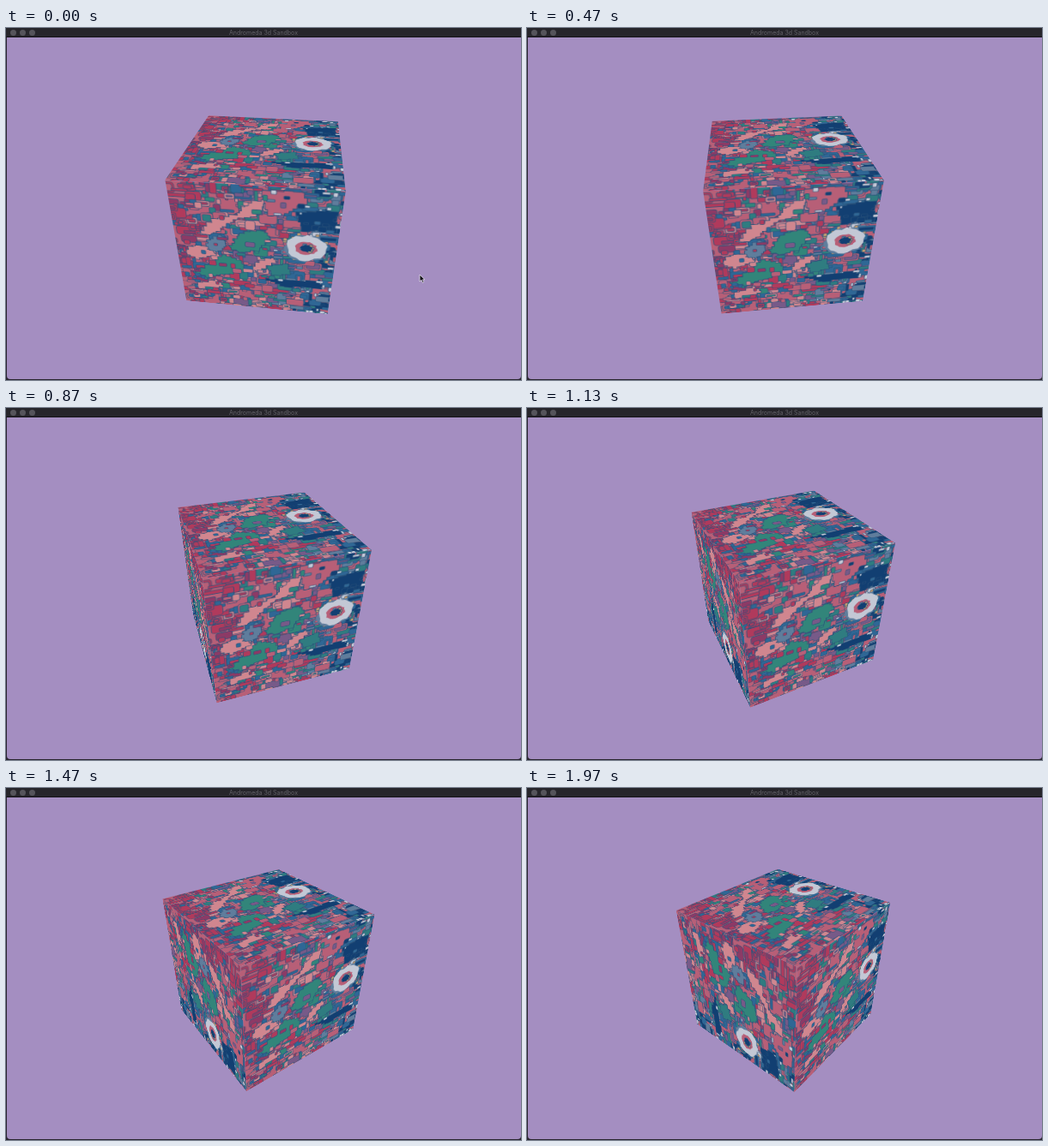
Animation, 600 px wide and 411 px high, one loop 2.01 s. Source, as an HTML page with a canvas:

```html
<!DOCTYPE html>
<html lang="en">
<head>
<meta charset="utf-8">
<title>Andromeda 3d Sandbox</title>
<style>
  html, body { margin: 0; width: 100%; height: 100%; overflow: hidden; background: #26252b; }
  #stage { position: relative; width: 600px; height: 411px; overflow: hidden; background: #29262f; }
  #bar { position: absolute; inset: 0 0 auto; height: 11px; background: #26252b; color: #626168;
         box-shadow: inset 0 -1px #151419;
         font: 7px/11px Inter, "Liberation Sans", sans-serif; text-align: center; }
  #bar i { position: absolute; top: 2px; width: 7px; height: 7px; border-radius: 50%; background: #55545b; }
  #view { position: absolute; left: 1px; top: 11px; width: 599px; height: 398.5px; overflow: hidden;
          border-radius: 0 0 4px 4px; background: #a48ec1;
          perspective: 431px; perspective-origin: 300px 199.5px; }
  #cube { position: absolute; left: 300px; top: 199.5px; width: 0; height: 0; transform-style: preserve-3d; }
  #cube canvas { position: absolute; left: -100px; top: -100px; width: 200px; height: 200px;
                 backface-visibility: hidden; }
  #cursor { position: absolute; left: 481px; top: 287px; }
</style>
</head>
<body>
<div id="stage">
  <div id="bar"><i style="left:5px"></i><i style="left:16px"></i><i style="left:27px"></i>Andromeda 3d Sandbox</div>
  <div id="view"><div id="cube"></div></div>
  <svg id="cursor" width="9" height="12" viewBox="0 0 9 12">
    <path d="M1 1V9L3 7.3L4.3 10.3L5.8 9.6L4.5 6.8H7Z" fill="#17151c" stroke="#e4dfec" stroke-width=".8"/>
  </svg>
</div>
<script>
const LOOP = 2010, FPS = 30, FRAMES = 60;
const START = -0.122, SPEED = 0.504; // radians, radians per second
const PITCH = -34.8, DEPTH = -113;
const SIZE = 256;

const C = {
  red: '#b03a5c', wine: '#8c3a66', rose: '#b75f77', pink: '#d0868f', mauve: '#775a88',
  teal: '#2f7c80', green: '#32857a', blue: '#2f6795', slate: '#5f7d9c',
  navy: '#123f72', white: '#c3c8d5', ochre: '#c09a70'
};
const INK = '#2a527a';

// Colour mix from the left edge to the right edge.
const MIX = [
  'red red red red wine rose wine blue',
  'red red wine rose pink teal blue pink',
  'rose pink mauve blue teal red green pink',
  'rose pink mauve blue slate green red teal',
  'rose rose mauve blue slate pink teal blue',
  'blue navy slate rose navy white blue teal'
].map(row => row.split(' '));

// Large patches: colour, then outline points in percent.
const PATCHES = [
  ['pink', 15,37, 24,25, 40,19, 46,11, 57,9, 55,19, 40,25, 31,32, 23,38],
  ['pink', 1,54, 10,47, 22,48, 25,55, 14,58],
  ['slate', 20,41, 29,36, 32,46, 27,52, 20,49],
  ['green', 8,71, 20,61, 29,53, 41,57, 46,66, 33,70, 20,74],
  ['green', 34,45, 41,34, 55,31, 60,38, 53,47, 42,50],
  ['pink', 47,60, 60,51, 64,57, 52,67],
  ['teal', 58,59, 71,56, 73,65, 62,68],
  ['pink', 6,82, 22,76, 28,82, 14,87],
  ['rose', 55,3, 78,2, 80,10, 70,18, 59,20],
  ['navy', 74,15, 97,12, 98,29, 88,28, 79,30],
  ['navy', 57,71, 91,68, 94,76, 69,77]
];

let seed = 41;
function rnd() {
  seed = (seed + 0x6D2B79F5) | 0;
  let t = Math.imul(seed ^ seed >>> 15, 1 | seed);
  t = t + Math.imul(t ^ t >>> 7, 61 | t) ^ t;
  return ((t ^ t >>> 14) >>> 0) / 4294967296;
}
const range = (a, b) => a + (b - a) * rnd();
const pick = list => list[Math.floor(rnd() * list.length)];

function paintTexture() {
  const cv = document.createElement('canvas');
  cv.width = cv.height = SIZE;
  const g = cv.getContext('2d');
  g.fillStyle = C.rose;
  g.fillRect(0, 0, SIZE, SIZE);
  g.lineWidth = 1.1;
  g.strokeStyle = INK;

  function block(x, y, w, h, color) {
    g.beginPath();
    g.roundRect(x, y, w, h, Math.min(w, h) / 4);
    g.fillStyle = color;
    g.fill();
    g.globalAlpha = 0.8;
    g.stroke();
    g.globalAlpha = 1;
  }

  function mixAt(x) {
    const i = Math.floor(x / SIZE * MIX.length + range(-0.6, 0.6));
    return C[pick(MIX[Math.max(0, Math.min(MIX.length - 1, i))])];
  }

  function scatter(count, maxW, maxH) {
    for (let i = 0; i < count; i++) {
      const x = range(-8, SIZE), y = range(-5, SIZE);
      const w = range(4, maxW), h = range(4, maxH);
      block(x, y, w, h, mixAt(x + w / 2));
      if (rnd() < 0.25 && w > 9 && h > 8) block(x + 3, y + 3, w - 6, h - 6, mixAt(x));
    }
  }

  // Outline built from small stair steps.
  function patch([name, ...pts]) {
    const n = pts.length / 2, k = SIZE / 100;
    g.beginPath();
    for (let i = 0; i < n; i++) {
      const j = (i + 1) % n;
      const x0 = pts[2 * i] * k, y0 = pts[2 * i + 1] * k;
      const dx = pts[2 * j] * k - x0, dy = pts[2 * j + 1] * k - y0;
      let x = x0;
      for (let s = 0; s < 4; s++) {
        const y = y0 + dy * s / 4 + range(-2, 2);
        g.lineTo(x, y);
        x = x0 + dx * (s + 1) / 4 + range(-2, 2);
        g.lineTo(x, y);
      }
    }
    g.closePath();
    g.fillStyle = C[name];
    g.fill();
    g.stroke();
  }

  function oval(rx, ry, color) {
    g.beginPath();
    for (let i = 0; i < 24; i++) {
      const a = i / 24 * Math.PI * 2, r = range(0.88, 1.1);
      g.lineTo(209 + rx * r * Math.cos(a), 108 + ry * r * Math.sin(a));
    }
    g.closePath();
    g.fillStyle = color;
    g.fill();
  }

  scatter(650, 30, 19);
  PATCHES.forEach(patch);
  scatter(110, 17, 11);

  for (let i = 0; i < 36; i++) {
    const x = SIZE * (1 - 0.42 * Math.pow(rnd(), 1.4));
    block(x - 5, range(0, SIZE), range(3, 12), range(3, 9), C[i % 3 ? 'white' : 'navy']);
  }
  for (let i = 0; i < 12; i++) block(range(172, 245), range(78, 138), 6, 6, C.ochre);

  oval(33, 27, C.slate);
  oval(31, 25, C.white);
  oval(17, 13, C.rose);
  for (let i = 0; i < 7; i++) block(range(194, 216), range(98, 112), 6, 5, C[i % 2 ? 'slate' : 'ochre']);
  oval(9, 7, C.navy);
  return cv;
}

const cube = document.getElementById('cube');
const cursor = document.getElementById('cursor');
const texture = paintTexture();

[
  'translateZ(100px)',
  'rotateX(90deg) translateZ(100px)',
  'rotateY(-90deg) translateZ(100px) rotateZ(90deg)'
].forEach(transform => {
  const face = document.createElement('canvas');
  face.width = face.height = SIZE;
  face.getContext('2d').drawImage(texture, 0, 0);
  face.style.transform = transform;
  cube.append(face);
});

function draw(now) {
  const t = now % LOOP;
  const step = Math.min(FRAMES - 1, Math.floor((t + 5) * FPS / 1000));
  const yaw = START + SPEED * step / FPS;
  cube.style.transform = `translateZ(${DEPTH}px) rotateX(${PITCH}deg) rotateY(${yaw}rad)`;
  cursor.style.visibility = step ? 'hidden' : 'visible';
}

const began = performance.now();
function tick() {
  draw(performance.now() - began);
  requestAnimationFrame(tick);
}
tick();
</script>
</body>
</html>
```
